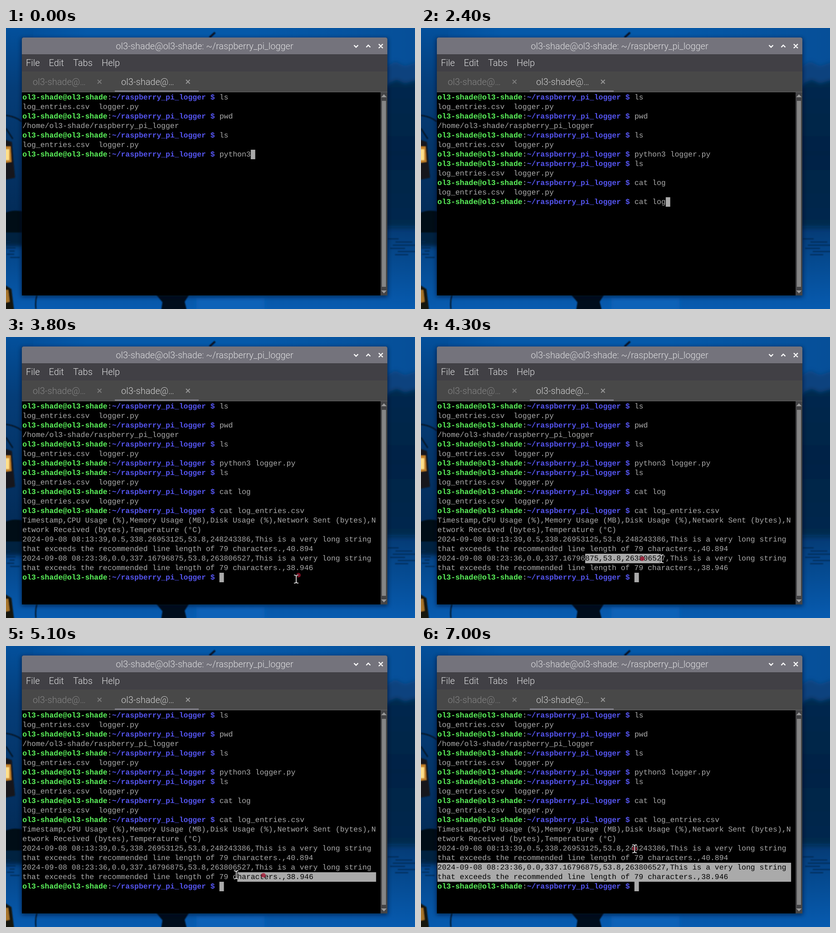
Animation of 902 by 621 pixels, one loop 7100 ms. Source, as an HTML page:

```html
<!DOCTYPE html>
<html lang="en">
<head>
<meta charset="utf-8">
<title>Logger terminal</title>
<style>
  html, body { margin: 0; width: 100%; height: 100%; overflow: hidden; background: #034d92; }
  svg { display: block; width: 902px; height: 621px; }
  text { white-space: pre; }
  .ui { font: 300 20px Roboto, sans-serif; fill: #dedee0; }
  .term { font: 16.45px "Liberation Mono", monospace; fill: #aaa; text-rendering: geometricPrecision; }
  .host { fill: #5bf25b; font-weight: 700; }
  .path { fill: #5555f0; font-weight: 700; }
  .line { fill: none; stroke-width: 2.4; }
  .thin { fill: none; stroke-width: 1.8; }
</style>
</head>
<body>
<svg viewBox="0 0 902 621">
  <defs>
    <linearGradient id="sky">
      <stop offset="0" stop-color="#034b95"/>
      <stop offset=".2" stop-color="#0559a9"/>
      <stop offset=".6" stop-color="#0559a9"/>
      <stop offset="1" stop-color="#064f98"/>
    </linearGradient>
    <linearGradient id="shore" x2="0" y2="1">
      <stop offset="0" stop-color="#03509c"/>
      <stop offset=".3" stop-color="#053d78"/>
      <stop offset="1" stop-color="#032a55"/>
    </linearGradient>
    <linearGradient id="trees" x2="0" y2="1">
      <stop offset="0" stop-color="#06294f"/>
      <stop offset=".5" stop-color="#042345"/>
      <stop offset="1" stop-color="#05294f"/>
    </linearGradient>
    <linearGradient id="water" x2="0" y2="1">
      <stop offset="0" stop-color="#053a73"/>
      <stop offset=".35" stop-color="#05488c"/>
      <stop offset="1" stop-color="#075bb0"/>
    </linearGradient>
    <filter id="soft" x="-30%" y="-30%" width="160%" height="160%"><feGaussianBlur stdDeviation="5"/></filter>
    <filter id="blur" x="-30%" y="-30%" width="160%" height="160%"><feGaussianBlur stdDeviation="1.3"/></filter>
  </defs>

  <rect width="902" height="621" fill="url(#sky)"/>
  <rect width="60" height="440" fill="url(#shore)"/>
  <rect y="440" width="902" height="181" fill="url(#water)"/>
  <g filter="url(#soft)">
    <path d="M830 90L858 74 880 84 915 72V150H830Z" fill="#08427e"/>
    <path d="M830 140L846 120 862 114 880 122 915 112V442H830Z" fill="url(#trees)"/>
    <path d="M-9 445H45V482H-9Z" fill="#04203f"/>
    <path d="M420 597H570V630H420Z" fill="#0b62b8"/>
  </g>
  <g id="ripples" stroke="#05284f" stroke-width="2" filter="url(#blur)"></g>
  <g filter="url(#blur)">
    <path d="M0 193Q22 196 35 207M0 222L15 245M66 621Q64 604 68 591" fill="none" stroke="#07121f" stroke-width="2.5"/>
    <path d="M449 21L461 10" stroke="#07101c" stroke-width="4"/>
    <path d="M-5 246L13 252 17 300 20 331 -5 336Z" fill="#14161a"/>
    <path d="M-5 262H10L12 296 -5 298Z" fill="#c5832a"/>
    <path d="M-5 268H7V292H-5Z" fill="#ffe08a"/>
    <path d="M-5 410Q14 400 40 406V452H-5Z" fill="#030c18"/>
    <path d="M-5 566L12 577 18 625H-5Z" fill="#18150f"/>
    <path d="M-5 579H5L8 605 -5 608Z" fill="#a8742a"/>
    <path d="M331 589H404L394 605 399 625H342L345 606Z" fill="#03101f"/>
  </g>

  <rect x="34" y="23" width="808" height="571" fill="#001020" opacity=".6" filter="url(#soft)"/>
  <path d="M35 591V25Q35 21 39 21H837Q841 21 841 25V591Z" fill="#000"/>
  <path d="M35 58V25Q35 21 39 21H837Q841 21 841 25V58Z" fill="#74737c"/>
  <rect x="35" y="58" width="806" height="39" fill="#414045"/>
  <rect x="35" y="96" width="806" height="45" fill="#484848"/>
  <rect x="35" y="141" width="806" height="1" fill="#666"/>
  <rect x="240" y="138" width="185" height="3" fill="#7c7b84"/>
  <rect x="826" y="142" width="15" height="449" fill="#444446"/>
  <rect x="829" y="161" width="9" height="411" fill="#858585"/>
  <path d="M827.5 153H839.5L833.5 146.5ZM827.5 580H839.5L833.5 586.5Z" fill="#999"/>
  <g class="ui">
    <text x="438" y="47" text-anchor="middle">ol3-shade@ol3-shade: ~/raspberry_pi_logger</text>
    <text x="44" y="84">File</text><text x="94.5" y="84">Edit</text>
    <text x="148" y="84">Tabs</text><text x="211" y="84">Help</text>
    <text x="59" y="126" fill="#858585">ol3-shade@…</text>
    <text x="254" y="126" fill="#d0d0d0">ol3-shade@…</text>
  </g>
  <path class="line" stroke="#fff" d="M767.5 38L772 42.5 776.5 38M794.5 42.5L799 38 803.5 42.5M822 35.5L831 44.5M831 35.5L822 44.5"/>
  <path class="thin" stroke="#7c7c7c" d="M202 114.5L210.5 123M210.5 114.5L202 123"/>
  <path class="thin" stroke="#999" d="M397 114.5L405.5 123M405.5 114.5L397 123"/>

  <g id="screen" class="term"></g>
  <circle id="glow" r="5" fill="#a8122f" opacity=".75"/>
  <g id="pointer" fill="none">
    <path id="beam" d="M-5 -9Q0 -9 0 -6Q0 -9 5 -9M0 -6V6M-5 9Q0 9 0 6Q0 9 5 9" stroke="#000" stroke-width="3.4"/>
    <path d="M-5 -9Q0 -9 0 -6Q0 -9 5 -9M0 -6V6M-5 9Q0 9 0 6Q0 9 5 9" stroke="#eee" stroke-width="1.7"/>
  </g>
</svg>
<script>
const LOOP = 7100, STEP = 100;
const LEFT = 36.3, TOP = 143, ROW = 21, COL = 9.872, COLS = 79;
const HOST = 'ol3-shade@ol3-shade', PATH = '~/raspberry_pi_logger $';
const PROMPT = `${HOST}:${PATH} `;
const FILES = 'log_entries.csv  logger.py\n';
const NOTE = 'This is a very long string\nthat exceeds the recommended line length of 79 characters.,';
const REPORT = '\nTimestamp,CPU Usage (%),Memory Usage (MB),Disk Usage (%),Network Sent (bytes),N\n' +
  'etwork Received (bytes),Temperature (°C)\n' +
  `2024-09-08 08:13:39,0.5,338.26953125,53.8,248243386,${NOTE}40.894\n` +
  `2024-09-08 08:23:36,0.0,337.16796875,53.8,263806527,${NOTE}38.946\n`;

// Terminal output: [time, text appended]
const output = [
  [0, `${PROMPT}ls\n${FILES}${PROMPT}pwd\n/home/ol3-shade/raspberry_pi_logger\n${PROMPT}ls\n${FILES}${PROMPT}python3`],
  [100, ' '], [200, 'l'], [300, 'o'], [400, 'g'], [500, 'g'], [600, 'er.py '],
  [900, '\n'], [1500, PROMPT], [1600, 'l'], [1700, 's'], [1800, `\n${FILES}${PROMPT}`],
  [1900, 'c'], [2000, 'at'], [2100, ' l'], [2200, 'og'], [2300, `\n${FILES}${PROMPT}cat log`],
  [2700, '_'], [2800, 'entries.csv '], [3100, REPORT + PROMPT]
];

// Pointer path: [time, x, y]
const track = [
  [3500, 670, 482], [3800, 640, 535], [4100, 362, 490], [4500, 698, 490], [4700, 748, 510],
  [4900, 748, 510], [5500, 27, 497], [5700, 27, 497], [6200, 471, 448]
];

const $ = id => document.getElementById(id);
const clamp = (v, lo, hi) => Math.min(hi, Math.max(lo, v));
const textAt = (col, row, body, attrs = '') =>
  `<text x="${LEFT + col * COL}" y="${TOP + row * ROW + 15}" ${attrs}>${body}</text>`;
const block = (col, row, width) =>
  `<rect x="${LEFT + col * COL}" y="${TOP + row * ROW}" width="${width * COL}" height="${ROW}" fill="#aaa"/>`;

function pointerAt(t) {
  const i = track.findIndex(p => p[0] > t);
  if (i < 0) return track[track.length - 1].slice(1);
  if (i === 0) return track[0].slice(1);
  const [t0, x0, y0] = track[i - 1], [t1, x1, y1] = track[i];
  const k = (t - t0) / (t1 - t0);
  return [x0 + (x1 - x0) * k, y0 + (y1 - y0) * k];
}

// Selected spans as [row, first column, end column]
function selectionAt(t) {
  if (t < 4100) return [];
  const [x, y] = pointerAt(Math.min(t, 5500));
  const col = clamp(Math.round((x - LEFT) / COL), 0, COLS);
  if (t < 4900) return [[16, 33, Math.min(col, 67)]];
  return y < 500 ? [[16, col, COLS], [17, 0, COLS]] : [[17, col, COLS]];
}

function lineMarkup(line, row) {
  if (!line.startsWith(PROMPT)) return textAt(0, row, line);
  return textAt(0, row, HOST, 'class="host"') +
    textAt(HOST.length, row, ':') +
    textAt(HOST.length + 1, row, PATH, 'class="path"') +
    textAt(PROMPT.length, row, line.slice(PROMPT.length));
}

function draw(t) {
  const lines = output.filter(e => e[0] <= t).map(e => e[1]).join('').split('\n');
  const last = lines.length - 1;
  let markup = lines.map(lineMarkup).join('');
  for (const [row, from, to] of selectionAt(t)) {
    markup += block(from, row, to - from) +
      textAt(from, row, lines[row].slice(from, to), 'fill="#000"');
  }
  $('screen').innerHTML = markup + block(lines[last].length, last, 1);

  const visible = t >= track[0][0] ? 'visible' : 'hidden';
  for (const [id, lag] of [['pointer', 0], ['glow', 50]]) {
    $(id).setAttribute('transform', `translate(${pointerAt(t - lag)})`);
    $(id).setAttribute('visibility', visible);
  }
}

$('ripples').innerHTML = Array.from({ length: 6 }, (_, i) => {
  const y = 466 + i * 7, x = 842 + (i * 17) % 23;
  return `<path d="M${x} ${y}h${24 + (i * 13) % 30}M${(i * 7) % 13} ${y + 6}h${10 + (i * 5) % 14}"/>`;
}).join('');

let shown = -1;
const start = performance.now();
function tick() {
  const t = Math.floor(((performance.now() - start) % LOOP) / STEP) * STEP;
  if (t !== shown) draw(shown = t);
  requestAnimationFrame(tick);
}
tick();
</script>
</body>
</html>
```
